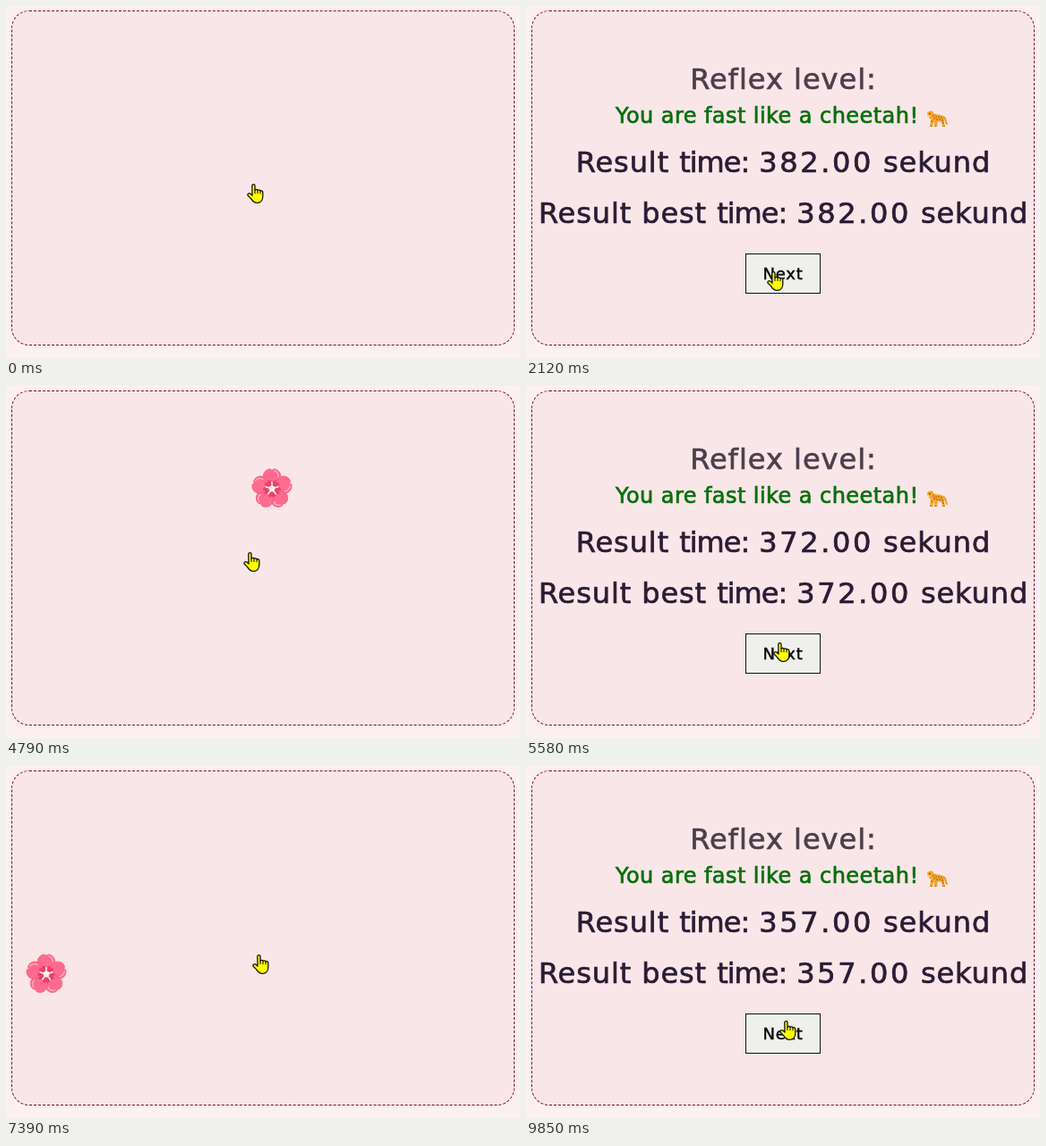
Write an HTML page that moves like this. It is 574x394 px and loops after 9.88 s.

```html
<!DOCTYPE html>
<html lang="en">
<head>
<meta charset="utf-8">
<title>Reflex game</title>
<style>
  html, body { margin: 0; width: 100%; height: 100%; overflow: hidden; background: #fdf0f2; }
  .panel {
    position: absolute; left: 6px; top: 5px; width: 562px; height: 375px;
    box-sizing: border-box; border: 1px dashed #7a0b36; border-radius: 20px; background: #f9e6e8;
  }
  svg { position: absolute; left: 0; top: 0; }
  text { font: 32px "DejaVu Sans", sans-serif; text-anchor: middle; stroke-width: .7px; }
  .title { fill: #4b3f4b; stroke: #4b3f4b; letter-spacing: 1px; }
  .level { fill: #066f0c; stroke: #066f0c; font-size: 24px; letter-spacing: .44px; text-anchor: start; }
  .score { fill: #2b1c35; stroke: #2b1c35; letter-spacing: .9px; }
  .tight { letter-spacing: -1px; }
  .wide { letter-spacing: 2.6px; }
  .next { fill: #0c0c10; stroke: #0c0c10; stroke-width: .5px; font-size: 18px; letter-spacing: .8px; }
</style>
</head>
<body>
<div class="panel"></div>
<svg id="stage" width="574" height="394" viewBox="0 0 574 394">
  <defs>
    <g id="petal">
      <path d="M0 0C-4-4-11-10-9.5-16C-8.5-20-4.5-22.5-1.5-22L0-20.5L1.5-22C4.5-22.5 8.5-20 9.5-16C11-10 4-4 0 0Z"
            fill="#ff6b8e" stroke="#f4557b" stroke-width=".7"/>
      <path d="M3-20.3C6-19 7.6-16 7-12.8" fill="none" stroke="#ffb3c4" stroke-width="1.2" stroke-linecap="round"/>
    </g>
    <path id="heart" d="M0 0C-4.5-3-5.5-7-4-9.5L0-8L4-9.5C5.5-7 4.5-3 0 0Z" fill="#ee3f66"/>
    <g id="stamen" fill="#fff0f3" stroke="#fff0f3">
      <path d="M0 0V-6.5" stroke-width="1.6"/>
      <circle cy="-7" r="1" stroke="none"/>
    </g>
    <g id="cheetah">
      <path d="M19 8C23 9 21 14 23 16" fill="none" stroke="#e89a22" stroke-width="1.8" stroke-linecap="round"/>
      <path d="M1 5C1 2 3 1 4 2C6 0 8 2 8 4C11 6 16 5 19 7C21 9 21 12 20 14L21 19H18L17 14L13 13L12 19H9L9 13L7 18H4L5 11C4 9 2 9 1 8Z"
            fill="#f6a62c"/>
      <path d="M1 6L4 7L3 9L1 8Z" fill="#ffe0ae"/>
      <circle cx="3.9" cy="4.6" r=".8" fill="#3b2a20"/>
      <path d="M8 7h.1M11 8h.1M14 8h.1M17 9h.1M9 10h.1M12 11h.1M15 11h.1M18 12h.1M6 13h.1M19 15h.1"
            stroke="#855020" stroke-width="1.5" stroke-linecap="round"/>
      <path d="M4 18.5h3M9 18.5h3M18 18.5h3" stroke="#c47b20"/>
    </g>
  </defs>
  <g id="hand">
    <g transform="translate(-9 -11)" stroke="#111" stroke-width="1.3" stroke-linejoin="round" stroke-linecap="round">
      <path d="M5.8 2.2C5.8.2 9 .2 9 2.2V7.2C10 6.1 11.6 6.3 12 7.3C13 6.4 14.6 6.8 15 7.9C16.2 7.2 17.8 7.9 17.8 9.5V14
               C17.8 18.3 15.3 21.4 11.6 21.4C8 21.4 6.2 19.4 4.6 16.6L1.2 13.2C.2 11.4 2.4 10 4 11.1L6 13Z" fill="#ff0"/>
      <path d="M9 7.2V10.5M12 7.5V10.5M15 8V10.8" fill="none" stroke-width="1.1"/>
    </g>
  </g>
</svg>
<script>
  const LOOP = 9880;
  const stage = document.getElementById('stage');
  const hand = document.getElementById('hand');

  // Flower place, time it appears, time of the click, time of Next
  const rounds = [
    { ms: 382, x: 410, y: 270, flower: 130, click: 510, next: 2330 },
    { ms: 372, x: 297, y: 115, flower: 4620, click: 4990, next: 5850 },
    { ms: 357, x: 45, y: 233, flower: 7270, click: 7630, next: LOOP }
  ];

  // time, x, y
  const path = [
    [0, 278, 210], [1270, 278, 210], [2050, 278, 308], [2400, 278, 308],
    [3150, 274, 197], [5080, 274, 197], [5560, 285, 298], [5900, 285, 298],
    [6850, 284, 222], [9450, 284, 222], [9850, 292, 296], [LOOP, 292, 296]
  ];

  function addGroup(markup) {
    const g = document.createElementNS('http://www.w3.org/2000/svg', 'g');
    g.innerHTML = markup;
    stage.insertBefore(g, hand);
    return g;
  }

  function play(el, frames) {
    el.animate(frames, { duration: LOOP, iterations: Infinity });
  }

  function showBetween(el, from, to) {
    const steps = [[0, 0], [from, 1], [to, 0], [LOOP, 0]];
    play(el, steps.map(([t, opacity]) => ({ offset: t / LOOP, opacity, easing: 'step-end' })));
  }

  const ring = id => [0, 72, 144, 216, 288]
    .map(a => `<use href="#${id}" transform="rotate(${a})"/>`).join('');

  const flower = ({ x, y }) => `<g transform="translate(${x} ${y})">
    ${ring('petal')}${ring('heart')}${ring('stamen')}
    <circle r="3.4" fill="#fff0f3"/></g>`;

  const score = (label, ms, y) => `<text class="score" x="287.5" y="${y}">${label} <tspan
    class="tight">time:</tspan> <tspan class="wide">${ms}.00</tspan> sekund</text>`;

  const result = ({ ms }) => `
    <text class="title" x="287.5" y="93">Reflex level:</text>
    <text class="level" x="100" y="131">You are fast like a cheetah!</text>
    <use href="#cheetah" x="447" y="116"/>
    ${score('Result', ms, 186)}
    ${score('Result best', ms, 243)}
    <rect x="245.5" y="277.5" width="83" height="44" fill="#efefeb" stroke="#111"/>
    <text class="next" x="287" y="306">Next</text>`;

  for (const r of rounds) {
    showBetween(addGroup(flower(r)), r.flower, r.click);
    showBetween(addGroup(result(r)), r.click, r.next);
  }

  play(hand, path.map(([t, x, y]) => ({
    offset: t / LOOP, transform: `translate(${x}px, ${y}px)`, easing: 'ease-in-out'
  })));
</script>
</body>
</html>
```
